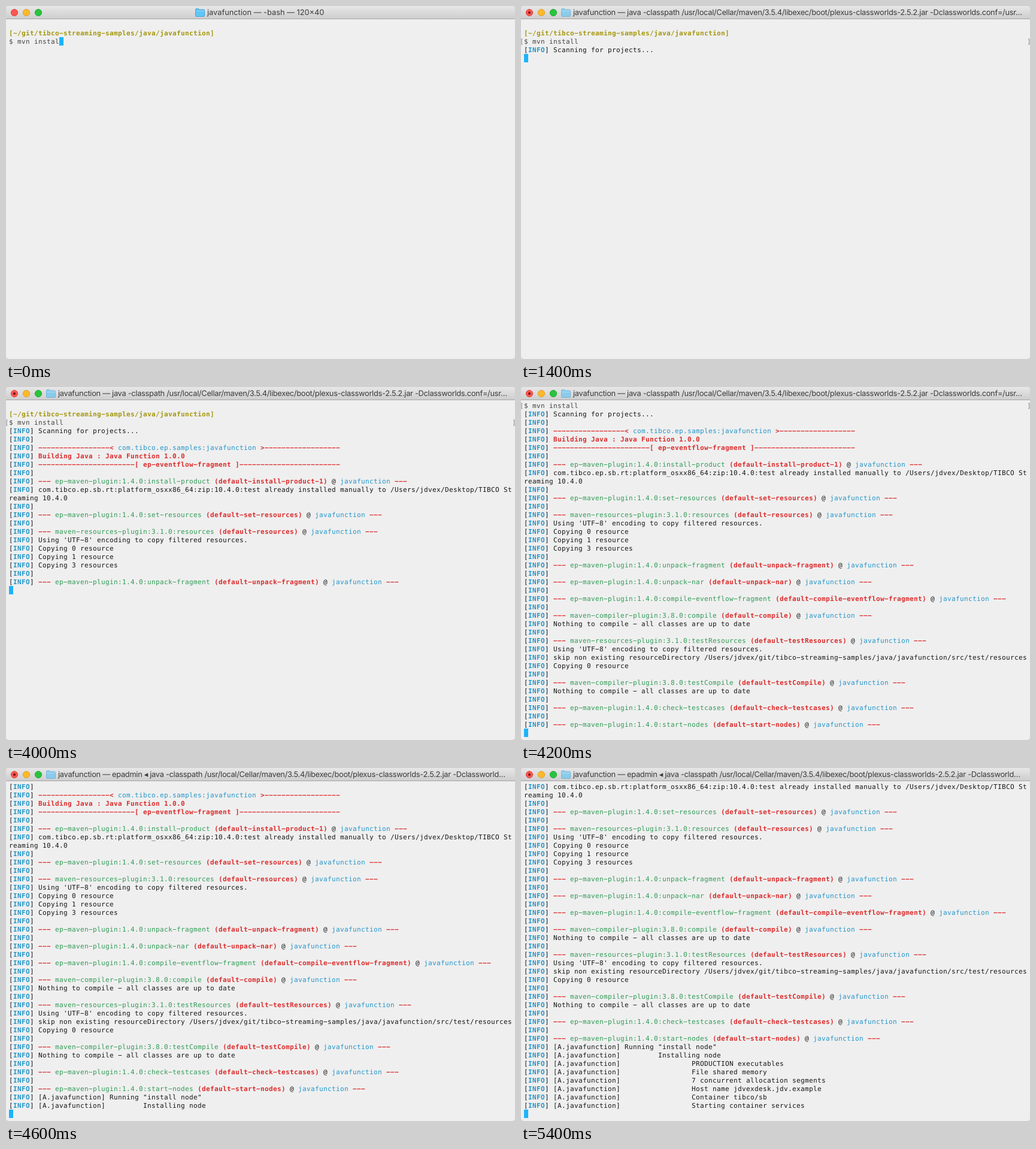
These frames come from a looping animation (850 px wide and 589 px high, 8 s). An HTML page:

```html
<!DOCTYPE html>
<html lang="en">
<head>
<meta charset="utf-8">
<title>Terminal build</title>
<style>
  html, body { margin: 0; width: 100%; height: 100%; overflow: hidden; background: #d4d4d4; }
  #window {
    position: relative; width: 850px; height: 589px; overflow: hidden;
    background: #efefef; border-radius: 5px; text-rendering: geometricPrecision;
  }
  #bar {
    position: absolute; z-index: 1; width: 850px; height: 21px;
    background: linear-gradient(#e8e7e8, #cfcecf); border-bottom: 1px solid #a6a6a6;
  }
  #bar svg { position: absolute; left: 0; top: 0; }
  #title {
    position: absolute; top: 0; white-space: pre; color: #3a3a3a;
    font: 12.8px/23px Inter, "DejaVu Sans", sans-serif;
  }
  #view { position: absolute; left: 0; top: 24px; width: 850px; height: 565px; overflow: hidden; }
  #screen {
    position: absolute; left: 5px; top: 0; white-space: pre; color: #161616;
    font: 11px/14px "DejaVu Sans Mono", monospace; letter-spacing: calc(7px - 1ch);
  }
  .row { position: relative; top: 1px; height: 14px; width: 840px; }
  .prompt { color: #444; }
  .mark::before, .mark::after { position: absolute; color: #858585; }
  .mark::before { content: "["; left: -7px; }
  .mark::after { content: "]"; left: 840px; }
  #cursor { position: absolute; width: 7px; height: 14px; background: #1cb4fb; }
  .path { color: #a5970f; }
  .cyan { color: #2495c9; }
  .red { color: #dc2c2c; }
  .green { color: #309b56; }
</style>
</head>
<body>
<div id="window">
  <div id="bar">
    <svg width="850" height="21">
      <g stroke-width="1">
        <circle cx="14" cy="11" r="5.6" fill="#fc5650" stroke="#df4640"/>
        <circle cx="34" cy="11" r="5.6" fill="#fdb928" stroke="#dea032"/>
        <circle cx="54" cy="11" r="5.6" fill="#2ac33d" stroke="#20a932"/>
      </g>
      <circle id="busy" cx="14" cy="11" r="2" fill="#6d0b08"/>
      <g id="folder">
        <path d="M0.5 16.5V6q0-1.5 1.5-1.5h3.5l1.5 1.5h7q1.5 0 1.5 1.5v9q0 1-1 1h-13q-1 0-1-1z" fill="#62c5f5" stroke="#3fa5da"/>
        <path d="M1 8.5h14" stroke="#8fdafb"/>
      </g>
    </svg>
    <div id="title"></div>
  </div>
  <div id="view"><div id="screen"></div></div>
</div>
<script>
const LOOP = 8000, ROW = 14, COL = 7, SCREEN_ROWS = 40;
const byId = id => document.getElementById(id);
const bold = (color, text) => `<b class="${color}">${text}</b>`;
const plain = (color, text) => `<span class="${color}">${text}</span>`;
const dashes = n => "-".repeat(n);

const info = (text = "") => `[${bold("cyan", "INFO")}] ${text}`;
const goal = (plugin, id) => [info(), info([
  bold("red", "---"), plain("green", plugin), bold("red", `(default-${id})`),
  "@", plain("cyan", "javafunction"), bold("red", "---")].join(" "))];
const ep = (name, id = name) => goal(`ep-maven-plugin:1.4.0:${name}`, id);
const node = (indent, text) => info("[A.javafunction]" + " ".repeat(indent) + text);
const encoding = info("Using 'UTF-8' encoding to copy filtered resources.");
const upToDate = info("Nothing to compile - all classes are up to date");
const copying = what => info("Copying " + what);

const lines = [
  "",
  bold("path", "[~/git/tibco-streaming-samples/java/javafunction]"),
  "",
  info("Scanning for projects..."),
  info(),
  info(bold("red", dashes(17) + "&lt; ") + plain("cyan", "com.tibco.ep.samples:javafunction")
    + bold("red", " &gt;" + dashes(18))),
  info(bold("red", "Building Java : Java Function 1.0.0")),
  info(bold("red", dashes(23) + "[ ep-eventflow-fragment ]" + dashes(24))),
  ...ep("install-product", "install-product-1"),
  info("com.tibco.ep.sb.rt:platform_osxx86_64:zip:10.4.0:test already installed manually to /Users/jdvex/Desktop/TIBCO St"),
  "reaming 10.4.0",
  ...ep("set-resources"),
  ...goal("maven-resources-plugin:3.1.0:resources", "resources"),
  encoding, copying("0 resource"), copying("1 resource"), copying("3 resources"),
  ...ep("unpack-fragment"),
  ...ep("unpack-nar"),
  ...ep("compile-eventflow-fragment"),
  ...goal("maven-compiler-plugin:3.8.0:compile", "compile"),
  upToDate,
  ...goal("maven-resources-plugin:3.1.0:testResources", "testResources"),
  encoding,
  info("skip non existing resourceDirectory /Users/jdvex/git/tibco-streaming-samples/java/javafunction/src/test/resources"),
  copying("0 resource"),
  ...goal("maven-compiler-plugin:3.8.0:testCompile", "testCompile"),
  upToDate,
  ...ep("check-testcases"),
  ...ep("start-nodes"),
  node(1, 'Running "install node"'),
  node(9, "Installing node"),
  ...["PRODUCTION executables", "File shared memory", "7 concurrent allocation segments",
    "Host name jdvexdesk.jdv.example", "Container tibco/sb", "Starting container services",
  ].map(text => node(17, text)),
];

// [start in ms, finished lines on screen]
const output = [[400, 3], [1400, 4], [2190, 8], [2400, 10], [4000, 22],
  [4200, 41], [4400, 42], [4600, 43], [5200, 48], [5400, 49]];

const javaCommand = "java -classpath /usr/local/Cellar/maven/3.5.4/libexec/boot/plexus-classworlds-2.5.2.jar -Dclassworld";
const titles = [
  { from: 0, text: "javafunction — -bash — 120×40", left: 316, spacing: 0 },
  { from: 400, text: `javafunction — ${javaCommand}s.conf=/usr…`, left: 67, spacing: -0.27 },
  { from: 4600, text: `javafunction — epadmin ◂ ${javaCommand}…`, left: 67, spacing: -0.27 },
];

// The minus sign gives the terminal's long, cell-wide hyphens.
const toRow = line => `<div class="row">${line.replaceAll("-", "\u2212")}</div>`;
const screen = byId("screen");
screen.innerHTML = lines.map(toRow).join("") + '<div id="cursor"></div>';
const rows = [...screen.querySelectorAll(".row")];
const promptRow = rows[2], cursor = byId("cursor"), title = byId("title"), folder = byId("folder");

function drawTitle(time) {
  const { text, left, spacing } = titles.findLast(entry => time >= entry.from);
  title.textContent = text;
  title.style.left = left + 20 + "px";
  title.style.letterSpacing = spacing + "px";
  folder.setAttribute("transform", `translate(${left} 0)`);
}

function drawScreen(time) {
  const running = time >= 400;
  const command = time < 200 ? "$ mvn instal" : "$ mvn install";
  const count = running ? output.findLast(([start]) => time >= start)[1] : 2;
  promptRow.textContent = command;
  promptRow.className = running ? "row prompt mark" : "row prompt";
  rows.forEach((row, i) => row.style.display = i < Math.max(count, 3) ? "" : "none");
  cursor.style.left = (running ? 0 : command.length * COL) + "px";
  cursor.style.top = count * ROW + "px";
  screen.style.top = -Math.max(0, count + 1 - SCREEN_ROWS) * ROW + "px";
  byId("busy").style.display = running ? "" : "none";
  folder.style.opacity = running ? 0.65 : 1;
}

function render(now) {
  const time = now % LOOP;
  drawTitle(time);
  drawScreen(time);
  requestAnimationFrame(render);
}
render(performance.now());
</script>
</body>
</html>
```
